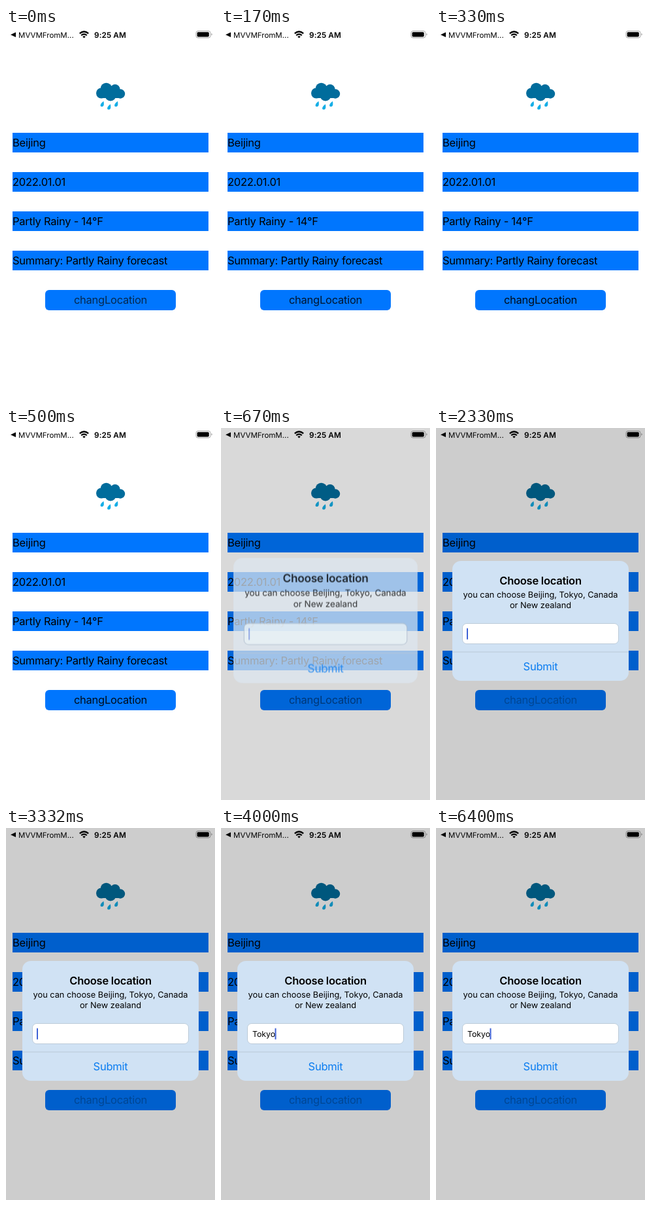
These frames come from a looping animation (320 by 568 pixels, 8000 ms). An HTML page:

```html
<!DOCTYPE html>
<html lang="en">
<head>
<meta charset="utf-8">
<title>Weather location dialog</title>
<style>
  html, body { margin: 0; width: 100%; height: 100%; overflow: hidden; background: #fff; }
  svg { display: block; width: 100%; height: 100%; }
  text {
    font: 16.5px Inter, "Liberation Sans", sans-serif;
    letter-spacing: -.25px;
    text-rendering: geometricPrecision;
  }
  .mid { text-anchor: middle; }
  .bars rect, .button rect { fill: #0076fe; }
  .status text { font-size: 11.5px; letter-spacing: 0; }
  .status .clock { font-size: 11.8px; font-weight: 600; letter-spacing: .1px; }
  .title { font-weight: 600; }
  .small { font-size: 12.8px; letter-spacing: -.02px; }
  .submit { fill: #0a7cf0; }

  .veil, .button text, .alert, .panel, .content, .field, .typed, .caret {
    animation: 8s step-end infinite;
  }
  .veil { mix-blend-mode: multiply; animation-name: veil; }
  .button text { animation-name: label; }
  .alert { transform-origin: 160px 294.5px; animation-name: alert; }
  .panel { animation-name: panel; }
  .content { animation-name: content; }
  .field { animation-name: field; }
  .typed { font-size: 12.3px; animation-name: typed; }
  .caret { animation-name: caret; }

  @keyframes veil {
    0% { fill: #fff; }
    8.375% { fill: #d9d9d9; }
    29.125%, 100% { fill: #cdcdcd; }
  }
  @keyframes label {
    0% { fill: #06294f; }
    2.125% { fill: #021630; }
    4.125% { fill: #000d1c; }
    8.375% { fill: #00418c; }
    29.125%, 100% { fill: #0057b8; }
  }
  @keyframes alert {
    0% { visibility: hidden; transform: none; }
    8.375% { visibility: visible; transform: translateY(-.5px) scale(1.044); }
    29.125%, 100% { visibility: visible; transform: none; }
  }
  @keyframes panel {
    0%, 8.375% { fill: #dde6f0; fill-opacity: .72; }
    29.125%, 100% { fill: #d0e2f4; fill-opacity: 1; }
  }
  @keyframes content {
    0%, 8.375% { opacity: .8; }
    29.125%, 100% { opacity: 1; }
  }
  @keyframes field {
    0%, 8.375% { fill: #e9f2f6; stroke: #aebccb; }
    29.125%, 100% { fill: #fff; stroke: #bccbd8; }
  }
  @keyframes typed {
    0% { opacity: 0; }
    50%, 100% { opacity: 1; }
  }
  @keyframes caret {
    0% { transform: none; opacity: .55; }
    29.125% { transform: none; opacity: 1; }
    50%, 100% { transform: translateX(35.5px); opacity: 1; }
  }
</style>
</head>
<body>
<svg viewBox="0 0 320 568">
  <defs>
    <path id="drop" d="M2.4-4.8C3.2-1 3.4 3.6-.2 3.6C-4 3.4-2.8-1.2 2.4-4.8Z"/>
  </defs>
  <rect width="320" height="568" fill="#fff"/>

  <g class="status">
    <path d="M7 10.3L15 6.6V14Z"/>
    <text x="19" y="14.5">MVVMFromM...</text>
    <g fill="none" stroke="#000" stroke-width="2.2">
      <path d="M112.8 8.4Q119.5 2.6 126.2 8.4"/>
      <path d="M115.2 11.2Q119.5 7.4 123.8 11.2"/>
    </g>
    <path d="M119.5 15.6L117.2 13.1Q119.5 11.3 121.8 13.1Z"/>
    <text class="clock" x="135" y="14.5">9:25 AM</text>
    <rect x="291" y="4.6" width="22" height="10.4" rx="3" fill="none" stroke="#a6a6a6"/>
    <rect x="292.6" y="6.2" width="18.2" height="7.2" rx="1.6"/>
    <path d="M314.4 8V11.6Q315.8 11 315.8 9.8T314.4 8Z" fill="#a6a6a6"/>
  </g>

  <g fill="#006c9c">
    <circle cx="146" cy="99.5" r="8"/>
    <circle cx="153.5" cy="92.500" r="8.800"/>
    <circle cx="167" cy="93.500" r="7.500"/>
    <circle cx="175" cy="100.500" r="7.200"/>
    <circle cx="160" cy="103" r="8.500"/>
    <rect x="146" y="95" width="29" height="12"/>
  </g>
  <g fill="#14aee6">
    <use href="#drop" x="147" y="116.5"/>
    <use href="#drop" x="157.5" y="121"/>
    <use href="#drop" x="168.5" y="116.5"/>
  </g>

  <g class="bars">
    <rect x="10" y="160" width="300" height="30"/>
    <rect x="10" y="220" width="300" height="30"/>
    <rect x="10" y="280" width="300" height="30"/>
    <rect x="10" y="340" width="300" height="30"/>
    <text x="10" y="181">Beijing</text>
    <text x="10" y="241">2022.01.01</text>
    <text x="10" y="301">Partly Rainy - 14°F</text>
    <text x="10" y="361">Summary: Partly Rainy forecast</text>
  </g>
  <g class="button">
    <rect x="60" y="400" width="200" height="31" rx="6"/>
    <text class="mid" x="160" y="421">changLocation</text>
  </g>

  <rect class="veil" width="320" height="568"/>

  <g class="alert">
    <rect class="panel" x="25" y="203" width="270" height="183" rx="13"/>
    <g class="content">
      <text class="mid title" x="160" y="238.5">Choose location</text>
      <text class="mid small" x="160" y="258.5">you can choose Beijing, Tokyo, Canada</text>
      <text class="mid small" x="160" y="274.5">or New zealand</text>
      <path d="M25 342H295" stroke="#b9c8d6"/>
      <rect class="field" x="40.5" y="298.5" width="239" height="31" rx="6.5"/>
      <text class="small typed" x="48" y="319">Tokyo</text>
      <rect class="caret" x="47" y="305.5" width="2" height="17.5" rx="1" fill="#3f62d6"/>
      <text class="mid submit" x="160" y="370">Submit</text>
    </g>
  </g>
</svg>
</body>
</html>
```
